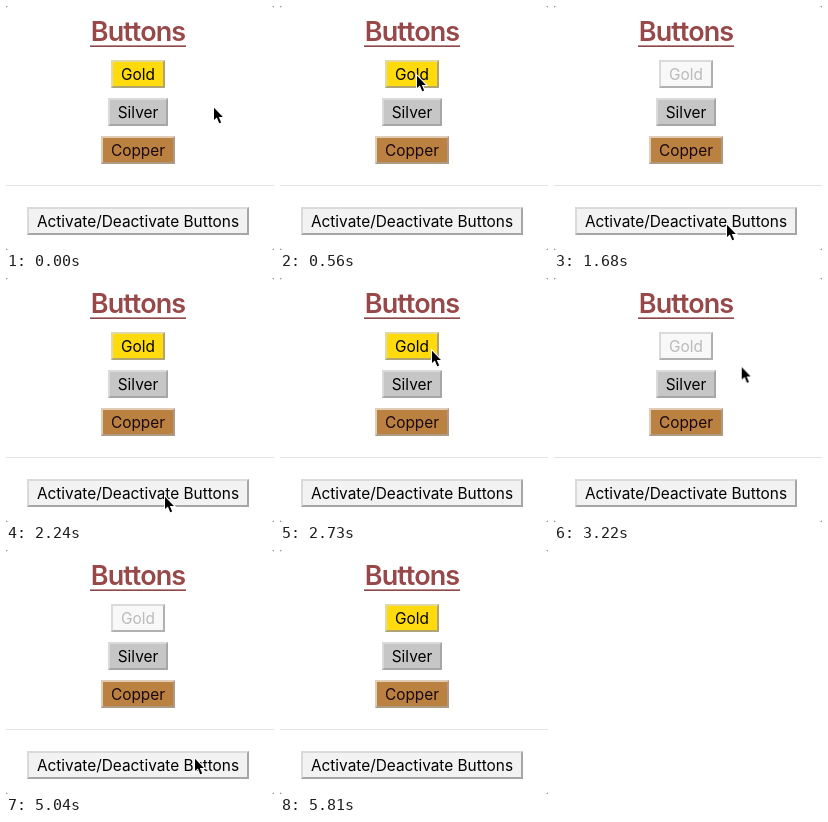
Recreate the animation shown at these times as an HTML page. Size 268 px wide and 244 px high, loop 5950 ms.

```html
<!DOCTYPE html>
<html lang="en">
<head>
<meta charset="utf-8">
<title>Buttons</title>
<style>
  :root {
    --loop: 5950ms step-end -4ms infinite;
  }
  html, body {
    margin: 0;
    width: 100%;
    height: 100%;
    overflow: hidden;
    background: #8c8c8c;
  }
  .stage {
    position: absolute;
    left: 0;
    top: 0;
    width: 268px;
    height: 244px;
    overflow: hidden;
    border-radius: 3px;
    background: #fff;
    font-family: Inter, "Liberation Sans", sans-serif;
    font-optical-sizing: none;
  }
  .stage > * { position: absolute; }
  h1 {
    left: 84px;
    top: 10px;
    width: 96px;
    height: 29.5px;
    margin: 0;
    display: flex;
    justify-content: center;
    color: #984848;
    font-size: 27px;
    font-weight: 600;
    line-height: 32px;
    letter-spacing: -.9px;
    white-space: nowrap;
  }
  .underline { left: 84px; top: 39px; width: 96px; height: 2px; background: linear-gradient(#b98a8a 50%, #8c4a4a 50%); }
  .btn {
    --hi: #dadada;
    --lo: #a6a6a6;
    --raised: var(--hi) var(--lo) var(--lo) var(--hi);
    --sunken: var(--lo) var(--hi) var(--hi) var(--lo);
    box-sizing: border-box;
    height: 28px;
    display: flex;
    justify-content: center;
    border: 2px solid;
    border-color: var(--raised);
    color: #000;
    font-size: 15.4px;
    line-height: 26px;
    white-space: nowrap;
  }
  .gold   { left: 105px; top: 54px;  width: 54px;  --hi: #e2d9a4; --lo: #aea572; background: #ffda0c; animation: gold var(--loop); }
  .silver { left: 102px; top: 92px;  width: 60px;  background: #c6c6c6; }
  .copper { left: 95px;  top: 130px; width: 74px;  --hi: #e0cdb8; --lo: #ad9a86; background: #bb8141; color: #180810; }
  .toggle { left: 21px;  top: 201px; width: 222px; background: #f2f2f2; animation: press var(--loop); }
  .rule   { left: 0; top: 179px; width: 268px; height: 1px; background: #e4e4e4; }

  .cursor {
    left: 0;
    top: 0;
    width: 12px;
    height: 20px;
    overflow: visible;
    animation: move var(--loop);
  }
  .arrow { stroke: #fff; stroke-width: 2; paint-order: stroke; }
  .ring {
    fill: none;
    stroke: #000;
    stroke-width: 3;
    opacity: 0;
    animation: click var(--loop);
  }

  /* the picture advances in 70 ms ticks, 85 per loop */
  @keyframes move {
    0%      { transform: translate(207px, 100px); animation-timing-function: steps(2); }
    2.353%  { transform: translate(202px, 96px);  animation-timing-function: steps(3); }
    5.882%  { transform: translate(158px, 74px);  animation-timing-function: steps(3); }
    9.412%  { transform: translate(136px, 68px);  animation-timing-function: steps(2); }
    11.765% { transform: translate(131px, 71px); }
    23.529% { transform: translate(131px, 71px);  animation-timing-function: steps(2); }
    25.882% { transform: translate(155px, 155px); animation-timing-function: steps(2); }
    28.235% { transform: translate(172px, 217px); }
    29.412% { transform: translate(172px, 217px); animation-timing-function: steps(3); }
    32.941% { transform: translate(158px, 217px); }
    37.647% { transform: translate(158px, 217px); animation-timing-function: steps(4); }
    42.353% { transform: translate(159px, 115px); animation-timing-function: steps(3); }
    45.882% { transform: translate(151px, 71px);  animation-timing-function: steps(2); }
    48.235% { transform: translate(144px, 71px); }
    50.588% { transform: translate(144px, 71px);  animation-timing-function: steps(4); }
    55.294% { transform: translate(201px, 93px); }
    57.647% { transform: translate(201px, 93px);  animation-timing-function: steps(3); }
    61.176% { transform: translate(141px, 71px); }
    62.353% { transform: translate(141px, 71px);  animation-timing-function: steps(2); }
    64.706% { transform: translate(139px, 69px); }
    75.294% { transform: translate(139px, 69px);  animation-timing-function: steps(4); }
    80%     { transform: translate(203px, 145px); animation-timing-function: steps(4); }
    84.706% { transform: translate(188px, 207px); }
    89.412% { transform: translate(188px, 207px); animation-timing-function: steps(5); }
    95.294%, 100% { transform: translate(200px, 250px); }
  }
  @keyframes click {
    0%, 15.294%, 36.471%, 49.412%, 69.412%, 74.118%, 89.412%, 100% { opacity: 0; }
    14.118%, 35.294%, 48.235%, 68.235%, 72.941%, 88.235% { opacity: 1; }
  }
  @keyframes press {
    0%, 36.471%, 89.412%, 100% { border-color: var(--raised); }
    35.294%, 88.235% { border-color: var(--sunken); }
  }
  @keyframes gold {
    0%, 36.471%, 89.412%, 100% { background: #ffda0c; color: #000; border-color: var(--raised); }
    14.118%, 48.235% { background: #ffda0c; color: #000; border-color: var(--sunken); }
    15.294%, 49.412% { background: #f8f8f8; color: #bababa; border-color: #dadada #b0b0b0 #b0b0b0 #dadada; }
  }
</style>
</head>
<body>
<div class="stage">
  <h1>Buttons</h1>
  <div class="underline"></div>
  <div class="btn gold">Gold</div>
  <div class="btn silver">Silver</div>
  <div class="btn copper">Copper</div>
  <div class="rule"></div>
  <div class="btn toggle">Activate/Deactivate Buttons</div>
  <svg class="cursor" viewBox="0 0 12 20">
    <circle class="ring" cx="1.8" cy="2.2" r="19.7"/>
    <path class="arrow" d="M1 1.8V14l2.9-2.6 2.3 5.9 2-.8-2.4-5.6h4.1z"/>
  </svg>
</div>
</body>
</html>
```
